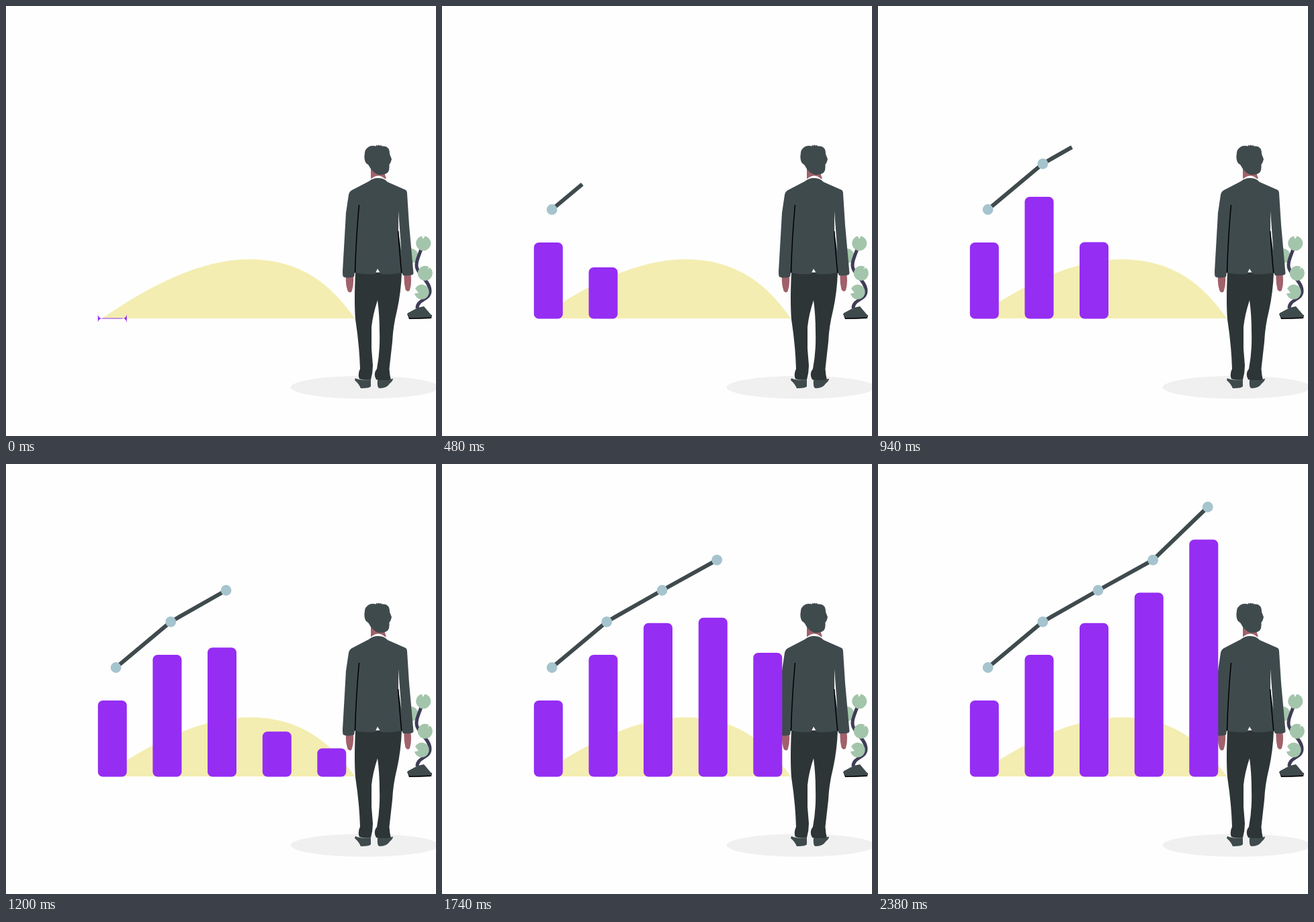
Animation of 640x640 px, one loop 2.42 s. Source, as an HTML page:

```html
<!DOCTYPE html>
<html lang="en">
<head>
<meta charset="utf-8">
<title>Growth chart</title>
<style>
  html, body { margin: 0; width: 100%; height: 100%; overflow: hidden; background: #fefefe; }
  svg { display: block; width: 100%; height: 100%; }
  .suit { fill: #3f4a4d; }
  .skin { fill: #a0616a; }
  .leaf { fill: #a3c5ab; }
  .bar { fill: #952df3; }
  .dot { fill: #a5c4cd; }
  .line { stroke: #3f4a4d; stroke-width: 6; }
  .seam { fill: none; stroke: #000; stroke-width: 1.5; }
</style>
</head>
<body>
<svg viewBox="0 0 640 640">
  <path fill="#f4edb1" d="M143 465C205 422 285 377 362 377C437 377 483 413 519 465Z"/>
  <ellipse cx="534" cy="567.5" rx="110.5" ry="17" fill="#f0f0f0"/>

  <g id="plant">
    <circle class="leaf" cx="602.5" cy="372" r="11"/>
    <path fill="none" stroke="#3f3d56" stroke-width="5" d="M618 362C613 375 609 384 612 391C616 402 631 411 631 424C631 438 612 436 612 450"/>
    <path class="leaf" d="M620.5 347L619 342.4A11 11 0 1 0 623.5 342.4Z"/>
    <path class="leaf" d="M627 392L629.5 388.4A11 11 0 1 0 631 389.5Z"/>
    <path class="leaf" d="M614 427L608 428A11 11 0 1 0 609 420.5Z"/>
    <path d="M597 458L600 466Q617 466 633 465L634 460Z"/>
    <path class="suit" d="M598 457L613 449L622 447L633 460Q634 463 631 463.5L601 464.5Q597 461 598 457Z"/>
  </g>

  <g id="man">
    <path class="skin" d="M539 234L543 241V257H566L563 248Z"/>
    <path class="suit" d="M538 211Q541 208 546 208L551 208.5L551.5 206.5L553 208L555 206.5L556 208L558 207L559 208.5Q566 208 568 211Q571 213 571 220L574 228Q573 233 570.5 236Q571 245 568 248Q562 252 554 251Q546 248 542 241Q540 236 536 234Q532 228 534 219Q534 214 538 211Z"/>
    <path fill="#fefefe" d="M541 260Q547 252.500 554 252.500Q562 253 567 261Z"/>
    <path class="skin" d="M506 403H517Q518 415 514.500 425Q511.500 428 508.500 424Q505 414 506 403ZM592.500 400H602.500Q604 414 601 423Q598 427 594.500 422Q592 412 592.500 400Z"/>
    <path fill="#2d3536" d="M520 397L589 396Q588 426 582 453Q576 477 575 500L570.500 540Q571 549 573 557Q560 559 551 556Q546 547 552 540Q557 514 556 485Q556 460 553 438Q546 459 544 478V510L546 535Q546 546 543 556Q534 558 526 555Q523 548 527 540Q526 505 520 466Q518 440 520 397Z"/>
    <path class="suit" d="M520 554Q529 558 543 556V566Q542 569 528 569Q525 562 519 557ZM553 556Q565 559 576 554.500Q576 558 571 562Q567 569 556 569Q552 569 553 556Z"/>
    <path class="suit" d="M540 261Q546 256 554 256Q563 256 568 262L593 273Q597 274 597 279L600 326L606.500 398Q606 402 591 401L589 397Q574 400 558 399L553 391L549 399Q535 400 519 397L518 403Q508 406 502 403Q501 402 501 395L506 308L510 281Q511 276 515 274Z"/>
    <path fill="#fefefe" d="M584 305L588.500 365L584 335Z"/>
    <path class="seam" d="M525.500 296Q521 345 519.500 397M583.700 335Q586 370 588.800 397"/>
  </g>

  <g id="chart"></g>
</svg>
<script>
  const LOOP = 2420, BASE = 465.5, WIDTH = 43, R = 7.5;

  // Times are [start, end] in ms.
  const bars = [
    { x: 136.8, top: 352, time: [-2, 380] },
    { x: 218.4, top: 284, time: [220, 840] },
    { x: 300, top: 236.7, time: [562, 1322] },
    { x: 381.8, top: 191.5, time: [987, 1860] },
    { x: 463.3, top: 112.5, time: [1041, 2380] }
  ];
  const dots = [
    { x: 163.6, y: 303, time: [300, 400] },
    { x: 245.2, y: 234.8, time: [545, 640] },
    { x: 327.6, y: 188, time: [1000, 1080] },
    { x: 409.2, y: 142.8, time: [1380, 1478] },
    { x: 490.8, y: 64, time: [2010, 2120] }
  ];
  const lineTimes = [[398, 548], [862, 1012], [1382, 1532], [2030, 2180]];

  const chart = document.getElementById("chart");
  function add(tag, cls) {
    const el = document.createElementNS("http://www.w3.org/2000/svg", tag);
    el.setAttribute("class", cls);
    return chart.appendChild(el);
  }
  function set(el, attrs) {
    for (const key in attrs) el.setAttribute(key, attrs[key]);
  }
  const progress = (t, [from, to]) => Math.min(1, Math.max(0, (t - from) / (to - from)));
  const show = p => p > 0 ? "visible" : "hidden";

  // The corner radius stays fixed, so a nearly flat bar crosses over itself.
  function barPath(x, height) {
    const top = BASE - height, r = R, k = R * 0.55, s = R - k;
    return `M${x + r} ${top}h${WIDTH - 2 * r}c${k} 0 ${r} ${s} ${r} ${r}` +
      `v${height - 2 * r}c0 ${k} ${-s} ${r} ${-r} ${r}` +
      `h${2 * r - WIDTH}c${-k} 0 ${-r} ${-s} ${-r} ${-r}` +
      `v${2 * r - height}c0 ${-k} ${s} ${-r} ${r} ${-r}z`;
  }

  bars.forEach(b => b.el = add("path", "bar"));
  const lines = lineTimes.map((time, i) => ({ time, a: dots[i], b: dots[i + 1], el: add("line", "line") }));
  dots.forEach(d => {
    d.el = add("circle", "dot");
    set(d.el, { cx: d.x, cy: d.y });
  });

  function draw(t) {
    for (const b of bars) {
      const p = progress(t, b.time);
      set(b.el, { d: barPath(b.x, (BASE - b.top) * p), visibility: show(p) });
    }
    for (const { el, time, a, b } of lines) {
      const p = progress(t, time);
      set(el, {
        x1: a.x, y1: a.y,
        x2: a.x + (b.x - a.x) * p, y2: a.y + (b.y - a.y) * p,
        visibility: show(p)
      });
    }
    for (const d of dots) {
      const p = progress(t, d.time);
      set(d.el, { r: 7.9 * p, visibility: show(p) });
    }
  }

  const start = performance.now();
  function tick() {
    draw((performance.now() - start) % LOOP);
    requestAnimationFrame(tick);
  }
  tick();
</script>
</body>
</html>
```
